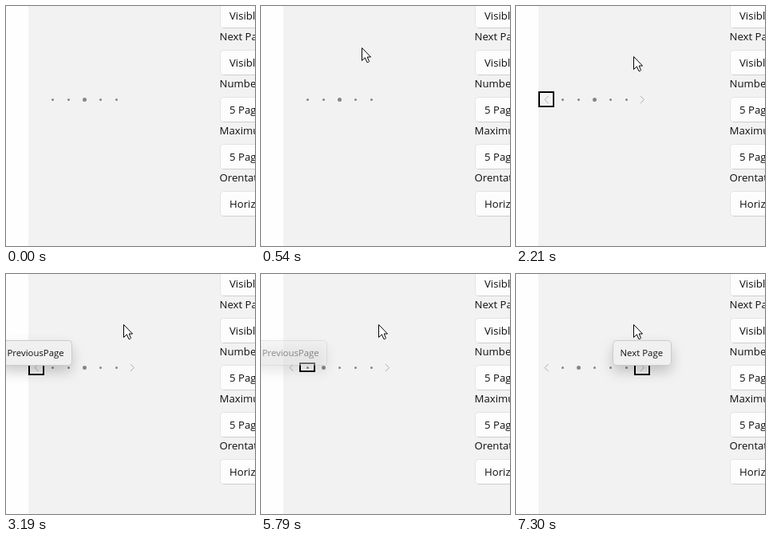
These frames come from a looping animation (312 by 301 pixels, 8000 ms). An HTML page:

```html
<!DOCTYPE html>
<html lang="en">
<head>
<meta charset="utf-8">
<title>Pager focus demo</title>
<style>
  html, body { margin: 0; width: 100%; height: 100%; overflow: hidden; background: #fefefe; }
  svg { display: block; width: 312px; height: 301px; }
  text { font-family: "Open Sans", "Noto Sans", sans-serif; font-size: 13.2px; fill: #101010; }
  .shade { fill: #000; fill-opacity: .2; filter: blur(8px); }
  .face rect { fill: #f0f0f0; stroke: #cbcbcb; }
  .face text { font-size: 11.4px; }
  .chevron { fill: none; stroke: #adadad; stroke-width: 1; }
</style>
</head>
<body>
<svg id="stage" viewBox="0 0 312 301">
  <rect width="312" height="301" fill="#fefefe"/>
  <rect x="28" width="284" height="301" fill="#f2f2f2"/>
  <g id="form"></g>
  <g id="arrows">
    <path class="chevron" d="M40.5 113L36 117.5L40.5 122"/>
    <path class="chevron" d="M156 113L160.5 117.5L156 122"/>
  </g>
  <g id="dots" fill="#868686"></g>
  <g id="focus" fill="none">
    <rect id="outer" stroke="#000" stroke-width="2"/>
    <rect id="inner" stroke="#fff"/>
  </g>
  <g id="tips"></g>
  <path id="cursor" fill="#fff" stroke="#000" stroke-linejoin="round"
    d="M.5 .5V16.5L4.4 12.8L6.9 18.5H8.5L9.5 17.5L7.2 12H11.5Z"/>
</svg>
<script>
const LOOP = 8000;
const $ = id => document.getElementById(id);

function add(parent, tag, attrs, text) {
  const el = document.createElementNS("http://www.w3.org/2000/svg", tag);
  set(el, attrs);
  if (text) el.textContent = text;
  parent.appendChild(el);
  return el;
}
function set(el, attrs) {
  for (const key in attrs) el.setAttribute(key, attrs[key]);
}

const fields = [
  ["", "Visible"],
  ["Next Page Button", "Visible"],
  ["Number of Pages", "5 Pages"],
  ["Maximum Pages", "5 Pages"],
  ["Orentation", "Horizontal"]
];
fields.forEach(([label, value], i) => {
  const y = i * 59, form = $("form");
  add(form, "text", { x: 267.5, y: y - 16 }, label);
  add(form, "rect", { x: 268.5, y: y - 3.5, width: 90, height: 31, rx: 4, fill: "#fdfdfd", stroke: "#e3e3e3" });
  add(form, "path", { d: `M272 ${y + 27.5}H312`, stroke: "#cecece" });
  add(form, "text", { x: 280, y: y + 17 }, value);
});

const dots = [0, 1, 2, 3, 4].map(i =>
  add($("dots"), "circle", { cx: 58.5 + i * 20, cy: 117.5 }));

// The shadow fades apart from the face, so it shows through a faint tooltip.
function makeTip(x, width, text) {
  const box = { x, width, height: 31, rx: 4 };
  const shade = add($("tips"), "g", {});
  add(shade, "rect", { ...box, y: 91.5, class: "shade" });
  const face = add($("tips"), "g", { class: "face" });
  add(face, "rect", { ...box, y: 83.5 });
  add(face, "text", { x: x + 9, y: 103 }, text);
  return [shade, face];
}
const prevTip = makeTip(-7.5, 90, "PreviousPage");
const nextTip = makeTip(121.5, 73, "Next Page");

// time, x, y
const path = [
  [20, 265, 288], [120, 215, 205], [200, 168, 128], [250, 147, 96],
  [320, 127, 56], [540, 126, 52], [1109, 126, 52], [1110, 126, 50],
  [1194, 126, 50], [1195, 132, 56], [1279, 132, 56], [1280, 138, 62],
  [1880, 138, 62], [1970, 147, 63], [LOOP, 147, 63]
];

const ramp = (t, a, b) => Math.min(1, Math.max(0, (t - a) / (b - a)));

function cursorAt(t) {
  const i = Math.max(1, path.findIndex(p => p[0] >= t));
  const [t0, x0, y0] = path[i - 1], [t1, x1, y1] = path[i];
  const k = ramp(t, t0, t1);
  return [x0 + (x1 - x0) * k, y0 + (y1 - y0) * k];
}

function focusBox(t) {
  if (t < 2210) return null;
  if (t < 5680) return [28, 107, 20, 20];
  if (t < 6190) return [48, 111, 20, 12];
  return [148, 107, 20, 20];
}

function inset(el, [x, y, w, h], d) {
  set(el, { x: x + d, y: y + d, width: w - 2 * d, height: h - 2 * d });
}

function fade(el, opacity) {
  el.style.opacity = opacity;
  el.style.display = opacity > 0 ? "" : "none";
}

function draw(t) {
  const [x, y] = cursorAt(t);
  set($("cursor"), { transform: `translate(${x} ${y})` });
  fade($("cursor"), t >= 20 ? 1 : 0);

  const hover = t >= 20 && x >= 28 && x <= 168 && y >= 107 && y <= 127;
  const box = focusBox(t);
  fade($("arrows"), box || hover ? 1 : 0);
  fade($("focus"), box ? 1 : 0);
  if (box) {
    inset($("outer"), box, 1);
    inset($("inner"), box, 2.5);
  }

  const page = t < 4910 ? 2 : 1;
  dots.forEach((dot, i) => set(dot, { r: i === page ? 2.5 : 1.5 }));

  const prev = ramp(t, 3045, 3190) * (1 - ramp(t, 5680, 5880));
  const next = ramp(t, 7045, 7300);
  prevTip.forEach(el => fade(el, prev));
  nextTip.forEach(el => fade(el, next));
}

const start = performance.now();
function tick() {
  draw((performance.now() - start) % LOOP);
  requestAnimationFrame(tick);
}
tick();
</script>
</body>
</html>
```
